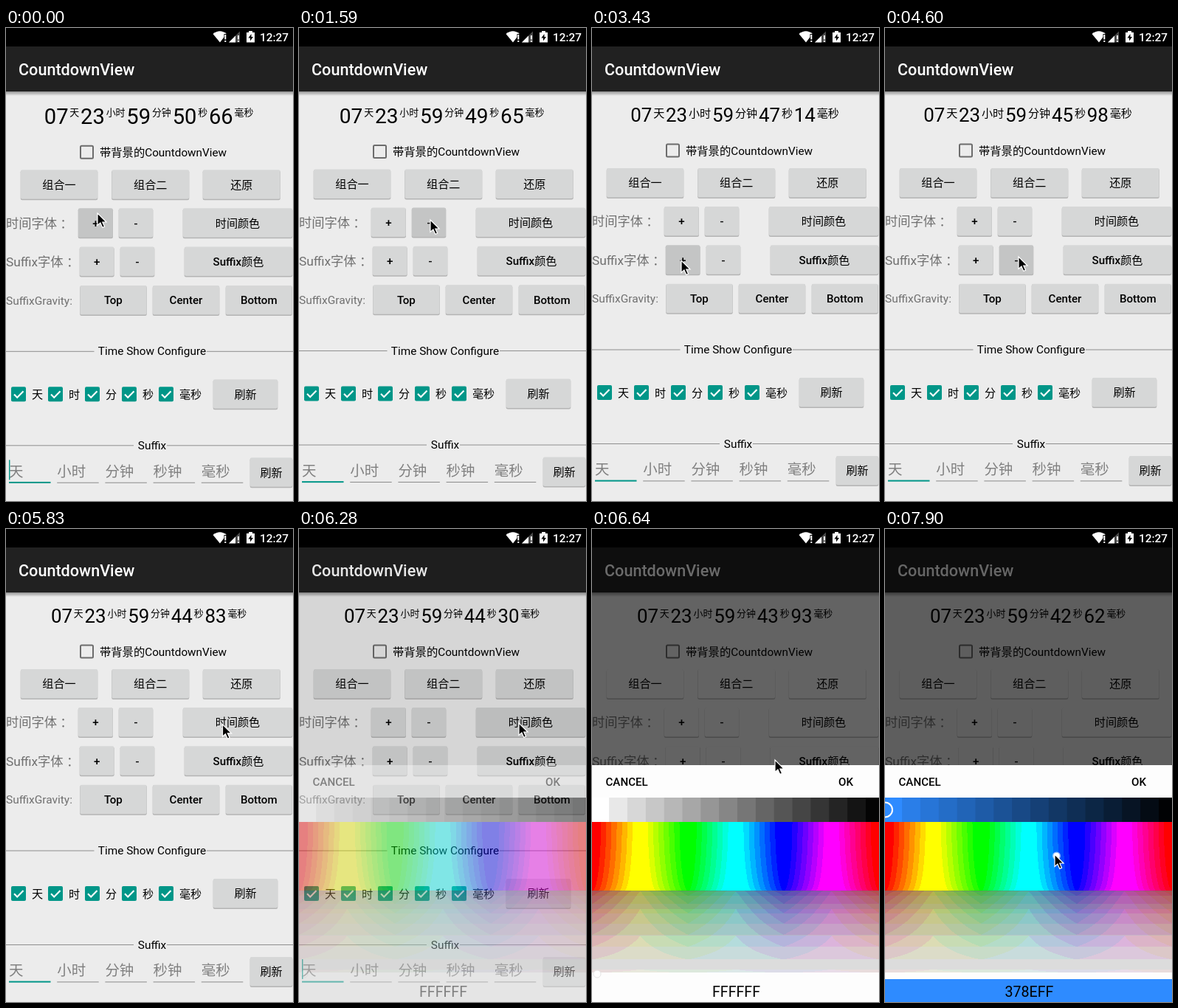
An HTML page with a canvas that plays this animation: 389 by 641 pixels, repeating every 7990 ms.

```html
<!DOCTYPE html>
<html lang="zh-CN">
<head>
<meta charset="utf-8">
<title>CountdownView</title>
<style>
html, body { margin: 0; width: 100%; height: 100%; overflow: hidden; background: #ececec; }
body { position: relative; }
svg, canvas, #dim, #dialog { position: absolute; left: 0; top: 0; display: block; }
svg { width: 389px; height: 641px; }
text { font-family: Roboto, 'Noto Sans CJK SC', 'Noto Sans CJK', sans-serif; white-space: pre; }
#dim { top: 25px; width: 389px; height: 616px; background: #000; }
#dialog { width: 389px; height: 641px; }
#palette { top: 397px; }
.body { fill: #d6d7d7; }
.flat .body { fill: #ececec; }
</style>
</head>
<body>
<svg id="app" viewBox="0 0 389 641"></svg>
<div id="dim"></div>
<div id="dialog">
  <svg id="panel" viewBox="0 0 389 641"></svg>
  <canvas id="palette" width="389" height="204"></canvas>
  <svg id="handles" viewBox="0 0 389 641"></svg>
</div>
<svg viewBox="0 0 389 641">
  <path id="cursor" d="M0 0V16.5L3.9 13L6.8 19.4L9.6 18.2L6.8 12H12Z" fill="#000" stroke="#fff" stroke-width="1.2"/>
</svg>
<script>
const LOOP = 7990;
const $ = id => document.getElementById(id);

const text = (x, y, size, label, attrs = '') =>
  `<text x="${x}" y="${y}" font-size="${size}" ${attrs}>${label}</text>`;
const rect = (x, y, w, h, fill, attrs = '') =>
  `<rect x="${x}" y="${y}" width="${w}" height="${h}" fill="${fill}" ${attrs}/>`;
const medium = 'font-weight="500"';

function button(x1, y, x2, label, id = '') {
  const w = x2 - x1;
  const body = rect(x1, y, w, 39.5, '#d6d7d7', 'rx="2" class="body"');
  return rect(x1 - .3, y + .6, w + .6, 40.4, '#b4b4b4', 'rx="2.3"') + body +
    (id && rect(x1, y, w, 39.5, '#000', `rx="2" id="${id}" opacity="0"`)) +
    text((x1 + x2) / 2, y + 25.3, 15.12, label,
      'text-anchor="middle"' + (/^[\x20-\x7e]/.test(label) ? ' ' + medium : ''));
}

function divider(y, left, right, x, label) {
  return rect(0, y, left, 1, '#8e8e8e') + rect(right, y, 389 - right, 1, '#8e8e8e') +
    text(x, y + 5.5, 15.4, label, 'text-anchor="middle"');
}

const checked = (x, label) =>
  rect(x, 484, 20, 20, '#009688', 'rx="2"') +
  `<path d="M${x + 4} 494.3l4.2 4.2l8.3-8.6" fill="none" stroke="#fff" stroke-width="2.1"/>` +
  text(x + 28, 499.8, 15.12, label);

const hint = (x, label, active) =>
  text(x, 605.3, 19.44, label, 'fill="#808080"') +
  (active ? rect(4, 612.6, 56.5, 2, '#009688') : rect(x, 613.4, 56.5, 1, '#8a8a8a'));

const caption = 'fill="#707070"';
$('app').innerHTML = `
  <defs><linearGradient id="shade" x2="0" y2="1">
    <stop stop-color="#000" stop-opacity=".38"/><stop offset="1" stop-opacity="0"/>
  </linearGradient></defs>
  ${rect(0, 0, 389, 641, '#ececec')}
  <g id="countdown"></g>
  <g id="content">
    ${rect(101, 157.5, 17, 17, 'none', 'rx="1.5" stroke="#6c6c6c" stroke-width="2"')}
    ${text(127, 171.5, 15.3, '带背景的CountdownView')}
    ${button(20, 190, 124, '组合一')}${button(143.5, 190, 248, '组合二')}${button(267, 190, 371.5, '还原')}
    ${text(0, 268.3, 17.28, '时间字体 ：', caption)}
    ${button(98, 242, 144.7, '+', 'timePlus')}${button(153, 242, 199, '-', 'timeMinus')}
    ${button(240, 242, 388, '时间颜色', 'timeColor')}
    ${text(0, 320.5, 17.28, 'Suffix字体 ：', caption)}
    ${button(100, 294.3, 146.3, '+', 'suffixPlus')}${button(155, 294.3, 201, '-', 'suffixMinus')}
    ${button(242, 294.3, 388, 'Suffix<tspan font-weight="400">颜色</tspan>')}
    ${text(0, 372.3, 15.5, 'SuffixGravity:', caption)}
    ${button(100.5, 346.7, 190.5, 'Top')}${button(199, 346.7, 289, 'Center')}${button(298, 346.7, 387.5, 'Bottom')}
    ${divider(435.5, 119.5, 272, 198, 'Time Show Configure')}
    ${['天', '时', '分', '秒', '毫秒'].map((s, i) => checked(7 + 50 * i, s)).join('')}
    ${button(281, 474, 368, '刷新')}
    ${divider(563, 173, 218, 198, 'Suffix')}
    ${['天', '小时', '分钟', '秒钟', '毫秒'].map((s, i) => hint(4 + 65.2 * i, s, !i)).join('')}
    ${rect(4, 583, 1.4, 27, '#009688', 'id="caret"')}
    ${button(331, 580, 388, '刷新')}
  </g>
  ${rect(0, 86, 389, 6, 'url(#shade)')}
  ${rect(0, 25, 389, 61, '#212121')}
  ${text(17, 64, 21.6, 'CountdownView', medium + ' fill="#fff"')}
  ${rect(0, 0, 389, 25, '#000')}
  <path d="M280.5 8Q290 .5 299 8L290 19.5Z" fill="#fff"/>
  ${rect(295.5, 8, 3.5, 12, '#000')}${rect(296.3, 9, 2, 6.5, '#fff')}${rect(296.3, 17, 2, 2, '#fff')}
  <path d="M302 19.5L317 4.5V19.5Z" fill="#4a4a4a"/><path d="M302 19.5L311 10.5V19.5Z" fill="#fff"/>
  ${rect(314, 10, 2, 5.5, '#fff')}${rect(314, 17, 2, 2, '#fff')}
  <path d="M326 6h3V4h5v2h3v13.5h-11Z" fill="#fff"/><path d="M332.5 8l-4 5.5h2.5v4l4-5.5h-2.5Z" fill="#000"/>
  ${text(344, 18.3, 15.4, '12:27', medium + ' fill="#fff"')}`;

// Countdown: five number/suffix pairs, laid out from the two font sizes.
const suffixes = ['天', '小时', '分钟', '秒', '毫秒'];
$('countdown').innerHTML = suffixes.map(s => text(0, 0, 1, '') + text(0, 0, 1, s)).join('');
const parts = [...$('countdown').children];

function place(node, x, y, size) {
  node.setAttribute('x', x);
  node.setAttribute('y', y);
  node.setAttribute('font-size', size);
}

function drawCountdown(left, timeSp, suffixSp) {
  const SP = 1.08, GAP = 1.8;
  const digits = timeSp * SP, small = suffixSp * SP, pair = digits * 1.123;
  const cs = Math.round(left * 100);
  const values = ['07', 23, 59, Math.floor(cs / 100), String(cs % 100).padStart(2, '0')];
  let x = (389 - 5 * (pair + 2 * GAP) - 8 * small) / 2;
  suffixes.forEach((s, i) => {
    parts[2 * i].textContent = values[i];
    place(parts[2 * i], x, 108.8 + digits * .711, digits);
    x += pair + GAP;
    place(parts[2 * i + 1], x, 108.1 + small * .84, small);
    x += s.length * small + GAP;
  });
}

// Colour dialog
const tones = Array.from({ length: 16 }, (_, i) => {
  const x = i ? 371 - 24.85 * (15 - i) : 0;
  return { x, light: i ? Math.max(0, 1 - (x + 12.4) / 389) : 1 };
});
$('panel').innerHTML = rect(0, 320, 389, 321, '#fdfdfd') +
  text(18.5, 348, 15.12, 'CANCEL', medium) + text(334, 348, 15.12, 'OK', medium) +
  tones.map(({ x }) => rect(x, 364, 389 - x, 33, '#fff', 'class="tone"')).join('') +
  rect(0, 610, 389, 31, '#fdfdfd', 'id="result"') +
  text(195.5, 634, 19.6, 'FFFFFF', 'id="hex" text-anchor="middle"');
$('handles').innerHTML = `
  <circle id="start" cx="7" cy="603" r="5" fill="#fff" stroke="#e4e4e4"/>
  <g id="chosen">
    <circle cx="0" cy="380.5" r="10" fill="none" stroke="#fff" stroke-width="2"/>
    <circle cx="232.5" cy="443" r="5.5" fill="#fff" opacity=".6"/><circle cx="232.5" cy="443" r="4" fill="#fff"/>
  </g>`;
const toneRects = [...document.querySelectorAll('.tone')];

// Hue runs across; pure banded colours above, muted ones fading to grey below.
function drawPalette() {
  const EDGE = 93, ctx = $('palette').getContext('2d');
  const img = ctx.createImageData(389, 204);
  const clamp = v => Math.min(1, Math.max(0, v));
  const channel = (x, k) => clamp(2 - Math.abs(((x / 389 * 6 - k + 9) % 6) - 3));
  const pure = (h, y) => {
    const bend = .18 * (1 - Math.sqrt(1 - (y / EDGE) ** 2));
    return h ? 255 * clamp(Math.floor((h + bend - .07) / .11) / 7) : 0;
  };
  const muted = (h, f) => {
    const hi = 168 + 64 * f ** .7, lo = 70 + 160 * f ** .75;
    return Math.min(232, Math.round((lo + (hi - lo) * h) / 20) * 20);
  };
  for (let y = 0; y < 204; y++) for (let x = 0; x < 389; x++) {
    const at = (y * 389 + x) * 4;
    for (let k = 0; k < 3; k++) {
      const h = channel(x, 2 * k);
      img.data[at + k] = y < EDGE ? pure(h, y) : muted(h, (y - EDGE) / 111);
    }
    img.data[at + 3] = 255;
  }
  ctx.putImageData(img, 0, 0);
}
drawPalette();

// Start, end and count of evenly spaced screen updates.
const ticks = [[0, 0, 1], [90, 870, 10], [960, 1670, 9], [1760, 2550, 10], [2640, 3430, 10],
  [3520, 4240, 9], [4330, 5050, 9], [5130, 5920, 10], [6010, 6730, 9], [6820, 7590, 10], [7650, 7900, 4]]
  .flatMap(([a, b, n]) => Array.from({ length: n }, (_, i) =>
    Math.ceil((a + (b - a) * i / Math.max(1, n - 1)) / 10) * 10));

// time, button, time size change, suffix size change
const presses = [[-110, 'timePlus', 0, 0], [270, 'timePlus', 1, 0],
  [1080, 'timeMinus', -1, 0], [1480, 'timeMinus', -1, 0], [1860, 'timeMinus', -1, 0], [2240, 'timeMinus', -1, 0],
  [2820, 'suffixPlus', 0, 1], [3270, 'suffixPlus', 0, 1], [3680, 'suffixPlus', 0, 1],
  [4450, 'suffixMinus', 0, -1], [4750, 'suffixMinus', 0, -1], [4980, 'suffixMinus', 0, -1],
  [6000, 'timeColor', 0, 0]];
const pressable = [...new Set(presses.map(p => p[1]))];

const remaining = [[0, 50.66], [1590, 49.65], [3430, 47.14], [4600, 45.98], [6280, 44.3], [6640, 43.93], [7900, 42.62]];
const pointer = [[0, 124, 251], [480, 124, 251], [980, 178, 260], [2330, 178, 260], [2740, 121, 315],
  [3800, 121, 315], [4250, 181, 310], [5150, 181, 310], [5830, 298, 263], [6290, 298, 263],
  [6640, 248, 313], [6820, 248, 315], [7500, 230, 441]];
const dimming = [[6190, 0], [6280, .095], [6640, .58], [6750, .6]];
const fading = [[6190, 0], [6280, .4], [6460, 1]];
const linear = p => p, smooth = p => p * p * (3 - 2 * p);

function at(table, t, ease = linear, col = 1) {
  const i = table.findIndex(row => row[0] > t);
  if (i < 0) return table[table.length - 1][col];
  if (!i) return table[0][col];
  const a = table[i - 1], b = table[i];
  return a[col] + (b[col] - a[col]) * ease((t - a[0]) / (b[0] - a[0]));
}

function render(now) {
  const t = ticks.filter(s => s <= now).pop();
  let timeSp = 27, suffixSp = 12;
  const glow = Object.fromEntries(pressable.map(id => [id, 0]));
  for (const [start, id, dTime, dSuffix] of presses) {
    const age = t - start;
    if (age >= 60) { timeSp += dTime; suffixSp += dSuffix; }
    glow[id] = Math.max(glow[id], at([[0, 0], [80, .085], [200, .085], [330, 0]], age));
  }
  for (const id of pressable) $(id).setAttribute('opacity', glow[id]);

  drawCountdown(at(remaining, t), timeSp, suffixSp);
  $('content').setAttribute('transform', `translate(0 ${.77 * (timeSp - 24)})`);
  $('content').setAttribute('class', t >= 6550 ? 'flat' : '');
  $('caret').setAttribute('opacity', (t + 100) % 1000 < 500 ? 1 : 0);
  $('cursor').setAttribute('transform', `translate(${at(pointer, t, smooth)} ${at(pointer, t, smooth, 2)})`);

  $('dim').style.opacity = at(dimming, t);
  $('dialog').style.opacity = at(fading, t);
  const picked = t >= 7650;
  const rgb = picked ? [46, 139, 255] : [255, 255, 255];
  toneRects.forEach((r, i) => r.setAttribute('fill', `rgb(${rgb.map(c => Math.round(c * tones[i].light))})`));
  $('result').setAttribute('fill', picked ? '#2e8bff' : '#fdfdfd');
  $('hex').textContent = picked ? '378EFF' : 'FFFFFF';
  $('start').setAttribute('opacity', picked ? 0 : 1);
  $('chosen').setAttribute('opacity', picked ? 1 : 0);
}

const origin = performance.now();
function frame() {
  render((performance.now() - origin) % LOOP);
  requestAnimationFrame(frame);
}
frame();
</script>
</body>
</html>
```
